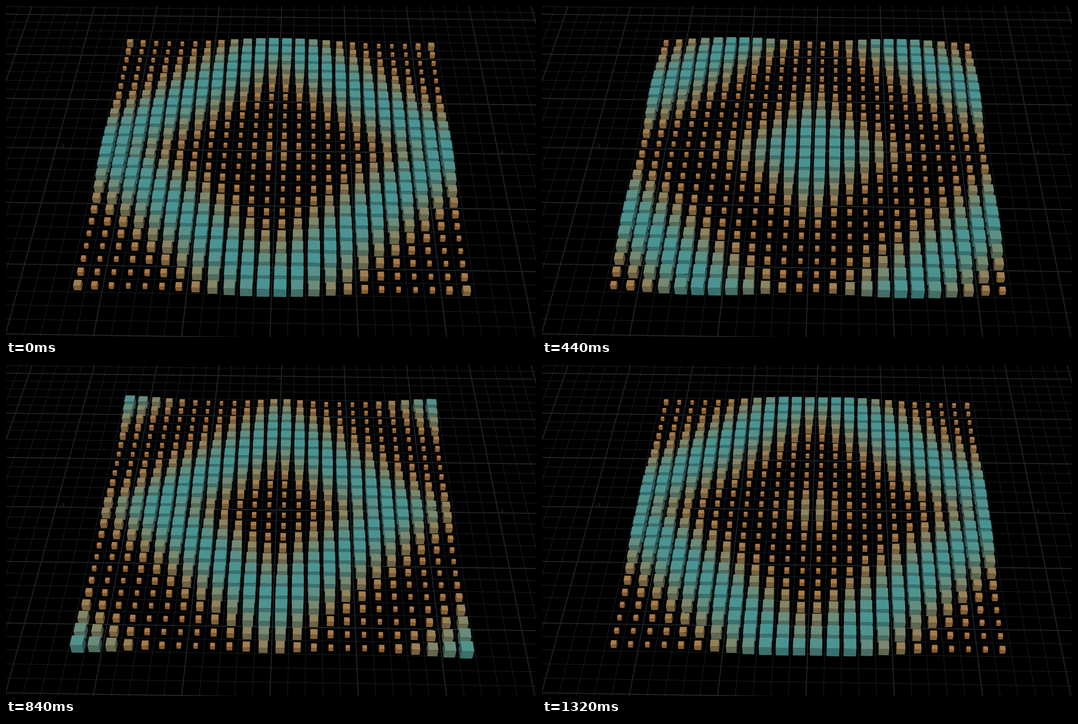
These frames come from a looping animation (947x591 px, 1360 ms). An HTML page:

```html
<!DOCTYPE html>
<html lang="en">
<head>
<meta charset="utf-8">
<title>Cube wave</title>
<style>
  html, body { margin: 0; width: 100%; height: 100%; overflow: hidden; background: #000; }
  svg { display: block; width: 947px; height: 591px; }
  text { font: 9px "Open Sans", sans-serif; fill: #30353a; }
</style>
</head>
<body>
<svg id="stage" viewBox="0 0 947 591"></svg>
<script>
const NS = "http://www.w3.org/2000/svg";
const stage = document.getElementById("stage");

const LOOP = 1360, STEP = 40, PERIOD = 690;
const COUNT = 24, GAP = 0.2;
const WARM = [178, 122, 66], COOL = [73, 148, 147];

// Camera as a 3x4 projection; y is up, z points towards the viewer.
const CAM = [
  [116.24, -23.95, -26.615, 428.15],
  [1.311, -95.96, 69.478, 229.3],
  [-0.0008, -0.0508, -0.04895, 0.88557]
];

function project(x, y, z) {
  const [px, py, w] = CAM.map(r => r[0] * x + r[1] * y + r[2] * z + r[3]);
  return [px / w, py / w];
}

function add(tag, attrs, parent = stage) {
  const el = document.createElementNS(NS, tag);
  for (const key in attrs) el.setAttribute(key, attrs[key]);
  return parent.appendChild(el);
}

const toPath = pts =>
  "M" + pts.map(p => p[0].toFixed(2) + " " + p[1].toFixed(2)).join("L");

function drawGrid() {
  let minor = "", major = "";
  const line = (i, a, b) => {
    const d = toPath([project(...a), project(...b)]);
    if (i % 5) minor += d; else major += d;
  };
  for (let i = -30; i <= 30; i++) {
    const v = i * GAP;
    line(i, [v, 0, -5], [v, 0, 4]);
    if (i >= -25 && i <= 20) line(i, [-6, 0, v], [6, 0, v]);
  }
  add("path", { d: minor, stroke: "#1b1e20", "stroke-width": 1, fill: "none" });
  add("path", { d: major, stroke: "#212527", "stroke-width": 1.8, fill: "none" });
}

// Text lying in the ground plane; one font unit is 0.01 world units.
function label(str, x, z, turned) {
  const o = project(x, 0, z);
  const diff = p => [p[0] - o[0], p[1] - o[1]];
  const dx = diff(project(x + 0.01, 0, z));
  const dz = diff(project(x, 0, z + 0.01));
  const m = turned ? [...dz, -dx[0], -dx[1], ...o] : [...dx, ...dz, ...o];
  add("text", { transform: `matrix(${m.join(" ")})` }).textContent = str;
}

function drawLabels() {
  for (let i = -3; i <= 3; i++) {
    label(String(i), i + 0.025, -0.01, false);
    label(String(-i), -0.075, i + 0.02, true);
  }
}

function makeCubes() {
  const cubes = [];
  const mid = (COUNT - 1) / 2;
  for (let row = 0; row < COUNT; row++) {
    for (let col = 0; col < COUNT; col++) {
      cubes.push({
        x: (col - mid) * GAP,
        z: (row - mid) * GAP,
        side: add("path", {}),
        front: add("path", {}),
        top: add("path", {})
      });
    }
  }
  return cubes;
}

function paint(el, pts, color, shade) {
  el.setAttribute("d", toPath(pts) + "Z");
  el.setAttribute("fill", `rgb(${color.map(c => Math.round(c * shade)).join(",")})`);
}

function drawCube(cube, t) {
  const { x, z } = cube;
  const wave = -Math.sin(2 * (Math.abs(x) + Math.abs(z)) + 2 * Math.PI * t / PERIOD);
  const h = (0.1 + 0.05 * wave) / 2;
  const mix = ((wave + 1) / 2) ** 2;
  const color = WARM.map((c, i) => c + (COOL[i] - c) * mix);
  const at = (sx, sy, sz) => project(x + sx * h, sy * h, z + sz * h);
  const s = x < 0 ? 1 : -1;
  paint(cube.side, [at(s, 1, -1), at(s, 1, 1), at(s, -1, 1), at(s, -1, -1)], color, 0.55);
  paint(cube.front, [at(-1, 1, 1), at(1, 1, 1), at(1, -1, 1), at(-1, -1, 1)], color, 0.76);
  paint(cube.top, [at(-1, 1, -1), at(1, 1, -1), at(1, 1, 1), at(-1, 1, 1)], color, 1);
}

drawGrid();
drawLabels();
const cubes = makeCubes();

let shown = -1;
function render(ms) {
  const step = Math.floor((ms % LOOP) / STEP);
  if (step === shown) return;
  shown = step;
  for (const cube of cubes) drawCube(cube, step * STEP);
}

const start = performance.now();
function tick() {
  render(performance.now() - start);
  requestAnimationFrame(tick);
}
tick();
</script>
</body>
</html>
```
